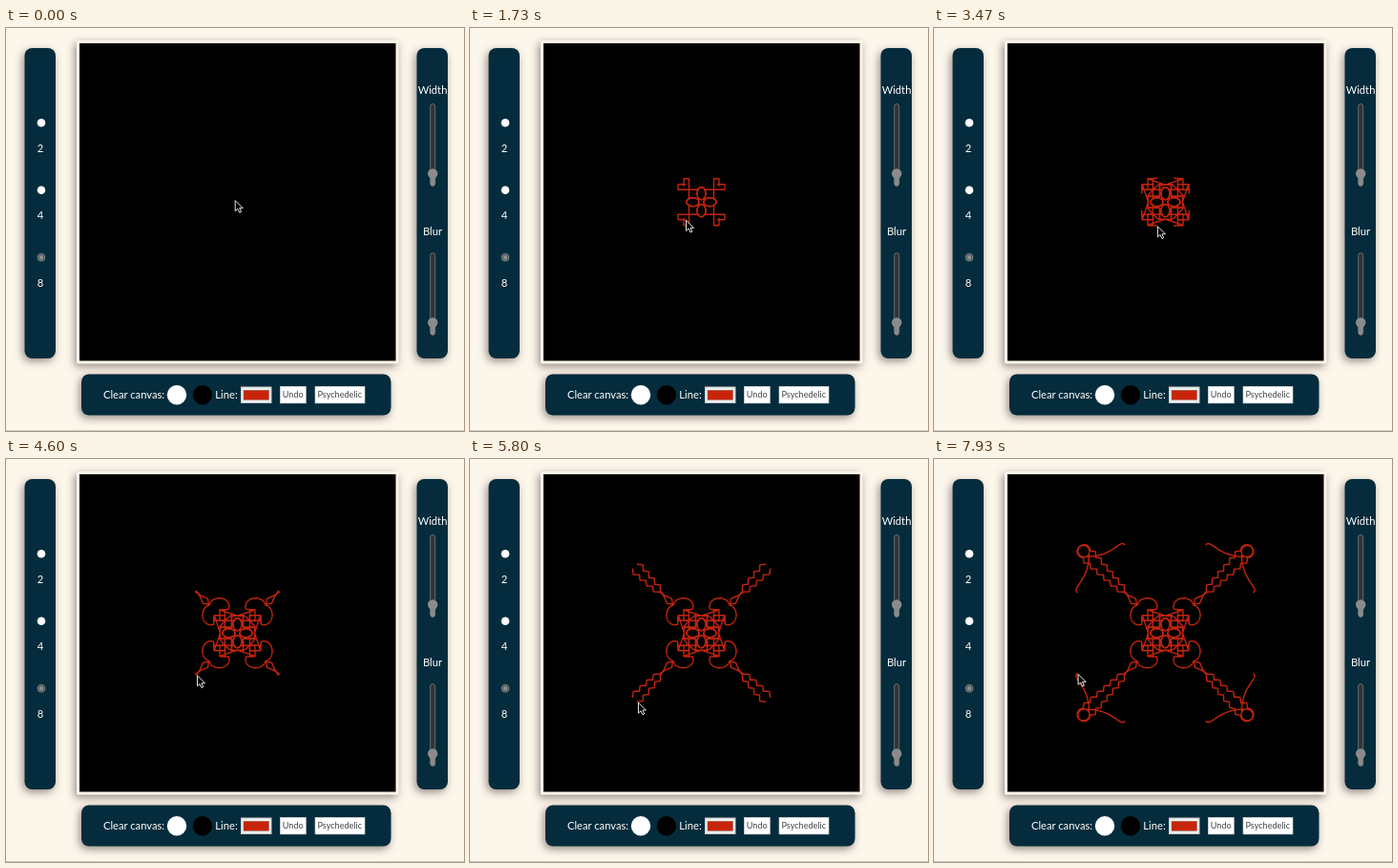
Animation, 480 px wide and 422 px high, one loop 8000 ms. Source, as an HTML page:

```html
<!DOCTYPE html>
<html lang="en">
<head>
<meta charset="utf-8">
<title>Kaleidoscope drawing</title>
<style>
  html, body { margin: 0; width: 100%; height: 100%; overflow: hidden; background: #fdf6eb; }
  svg { display: block; width: 100%; height: 100%; }
  text { font: 11.2px Lato, sans-serif; fill: #fff; }
  .button { font-size: 9.1px; fill: #444; }
  .mid { text-anchor: middle; }
  .shadow { filter: drop-shadow(-2px 3px 4.5px rgba(50, 35, 35, .5)); }
</style>
</head>
<body>
<svg viewBox="0 0 480 422">
  <defs>
    <polyline id="stroke" fill="none" stroke="#c4240d" stroke-width="1.4" stroke-linejoin="round" stroke-linecap="round"/>
    <g id="slider">
      <rect x="444.7" width="5" height="86" rx="2.5" fill="#333" stroke="#686c6e"/>
      <rect x="444.8" y="73" width="4.8" height="13" rx="2.4" fill="#8b8b8b"/>
      <circle cx="447.2" cy="73" r="5.2" fill="#8b8b8b"/>
    </g>
  </defs>

  <rect width="480" height="422" fill="#fdf6eb"/>
  <rect y="421" width="480" height="1" fill="#c9cccb"/>
  <g class="shadow" fill="#042c3c">
    <rect x="19.5" y="21" width="32.5" height="325" rx="8"/>
    <rect x="430.5" y="21" width="32.5" height="325" rx="8"/>
    <rect x="79" y="362.5" width="324.5" height="43" rx="8"/>
  </g>
  <rect class="shadow" x="74" y="13" width="337.5" height="338.5" rx="2" fill="#fdf6eb"/>
  <rect x="77" y="16" width="331.5" height="332.5"/>

  <g fill="#fff">
    <circle cx="37" cy="99.3" r="4.3"/>
    <circle cx="37" cy="169.8" r="4.3"/>
  </g>
  <circle cx="37" cy="240.2" r="3.9" fill="#173440" stroke="#8b8b8b"/>
  <circle cx="37" cy="240.2" r="2.6" fill="#8b8b8b"/>
  <g class="mid">
    <text x="36" y="129.8">2</text>
    <text x="36" y="200.2">4</text>
    <text x="36" y="270.6">8</text>
    <text x="447" y="69">Width</text>
    <text x="447" y="216.5">Blur</text>
  </g>
  <use href="#slider" y="79.5"/>
  <use href="#slider" y="235.5"/>

  <text x="102" y="388">Clear canvas:</text>
  <circle cx="179" cy="384.2" r="10.2" fill="#fff"/>
  <circle cx="206" cy="384.2" r="10.2"/>
  <text x="219.3" y="388">Line:</text>
  <rect x="246.5" y="376" width="31.5" height="16.5" fill="#efefef" stroke="#c9c9c9"/>
  <rect x="249" y="379.3" width="26.5" height="10" fill="#c8240a" stroke="#8d6a62" stroke-width=".5"/>
  <g fill="#fff" stroke="#d2d2d2" stroke-width=".6">
    <rect x="287.3" y="375.3" width="27" height="17.6"/>
    <rect x="324" y="375.3" width="52" height="17.6"/>
  </g>
  <g class="mid">
    <text class="button" x="300.7" y="387.2">Undo</text>
    <text class="button" x="349.8" y="387.2">Psychedelic</text>
  </g>

  <g id="copies" transform="translate(242.5 182.2)"></g>
  <path id="cursor" d="M0 0V11L2.6 8.7 4.5 12.7 6.3 11.9 4.5 8H8Z" stroke="#fff" stroke-width=".9" stroke-linejoin="round"/>
</svg>

<script>
const LOOP = 8000, STEP = LOOP / 120, START = 200, SAMPLES = 90;
const mix = (a, b, k) => a.map((v, i) => v + (b[i] - v) * k);

// Each helper returns a path: progress 0..1 -> point relative to the centre of symmetry.
const arc = (cx, cy, rx, ry, from, to) => u => {
  const angle = from + (to - from) * u;
  return [cx + rx * Math.cos(angle), cy + ry * Math.sin(angle)];
};

const lines = (...points) => u => {
  const i = Math.min(Math.floor(u * (points.length - 1)), points.length - 2);
  return mix(points[i], points[i + 1], u * (points.length - 1) - i);
};

const stairs = (from, to, count, depth) => u => {
  const bump = depth * (1 - Math.abs(2 * (u * count % 1) - 1)) / Math.SQRT2;
  return mix(from, to, u).map(v => v + bump);
};

const bezier = (...points) => u => {
  while (points.length > 1 && u >= 0) {
    let level = points;
    while (level.length > 1) level = level.slice(1).map((p, i) => mix(level[i], p, u));
    return level[0];
  }
};

// The hand-drawn stroke, leg by leg; each leg begins when the one before ends.
const legs = [
  { end: 1000, path: arc(-9, 0, 6.5, 4.5, -0.5, 2.75 * Math.PI) },                          // petal
  { end: 1730, path: lines([-13, 3], [-13, 13], [-24.5, 13], [-24.5, 18.5], [-13, 18.5]) }, // corner flag
  { end: 2730, path: lines([-13, 13], [-19, 6], [-6, 6], [-6, 18], [0, 18]) },              // lattice
  { end: 3470, path: lines([0, 18], [-18, 24], [-9, 25]) },                                 // border
  { end: 4000, path: arc(-19, 28, 10.5, 8.5, -0.35, Math.PI - 0.2) },                       // shoulder
  { end: 4600, path: lines([-29, 30], [-36, 31], [-39, 38], [-43, 44]) },                   // crossing
  { end: 6390, path: stairs([-43, 44], [-79, 86], 6, 4) },                                  // arm
  { end: 7200, path: arc(-85.3, 86, 6.4, 6.4, 0, 1.8 * Math.PI) },                          // tip
  { end: 7930, path: bezier([-80, 82], [-80, 52], [-102, 47], [-90, 41]) }                  // hook
];

const stroke = document.getElementById("stroke");
const cursor = document.getElementById("cursor");
const symmetries = [];
for (const x of [1, -1]) for (const y of [1, -1]) symmetries.push([x, 0, 0, y], [0, y, x, 0]);
document.getElementById("copies").innerHTML = symmetries
  .map(m => `<use href="#stroke" transform="matrix(${m} 0 0)"/>`).join("");

function render(time) {
  const t = Math.max(START, Math.floor(time / STEP + 1e-6) * STEP);
  const trail = [];
  let start = START;
  for (const { end, path } of legs) {
    if (t < start) break;
    const progress = Math.min(1, (t - start) / (end - start));
    for (let i = 0; i < progress * SAMPLES; i++) trail.push(path(i / SAMPLES));
    trail.push(path(progress));
    start = end;
  }
  const [x, y] = trail[trail.length - 1];
  stroke.setAttribute("points", trail.join(" "));
  cursor.setAttribute("transform", `translate(${243.5 + x} ${182.8 + y})`);
}

function tick(now) {
  render(now % LOOP);
  requestAnimationFrame(tick);
}
render(0);
requestAnimationFrame(tick);
</script>
</body>
</html>
```
